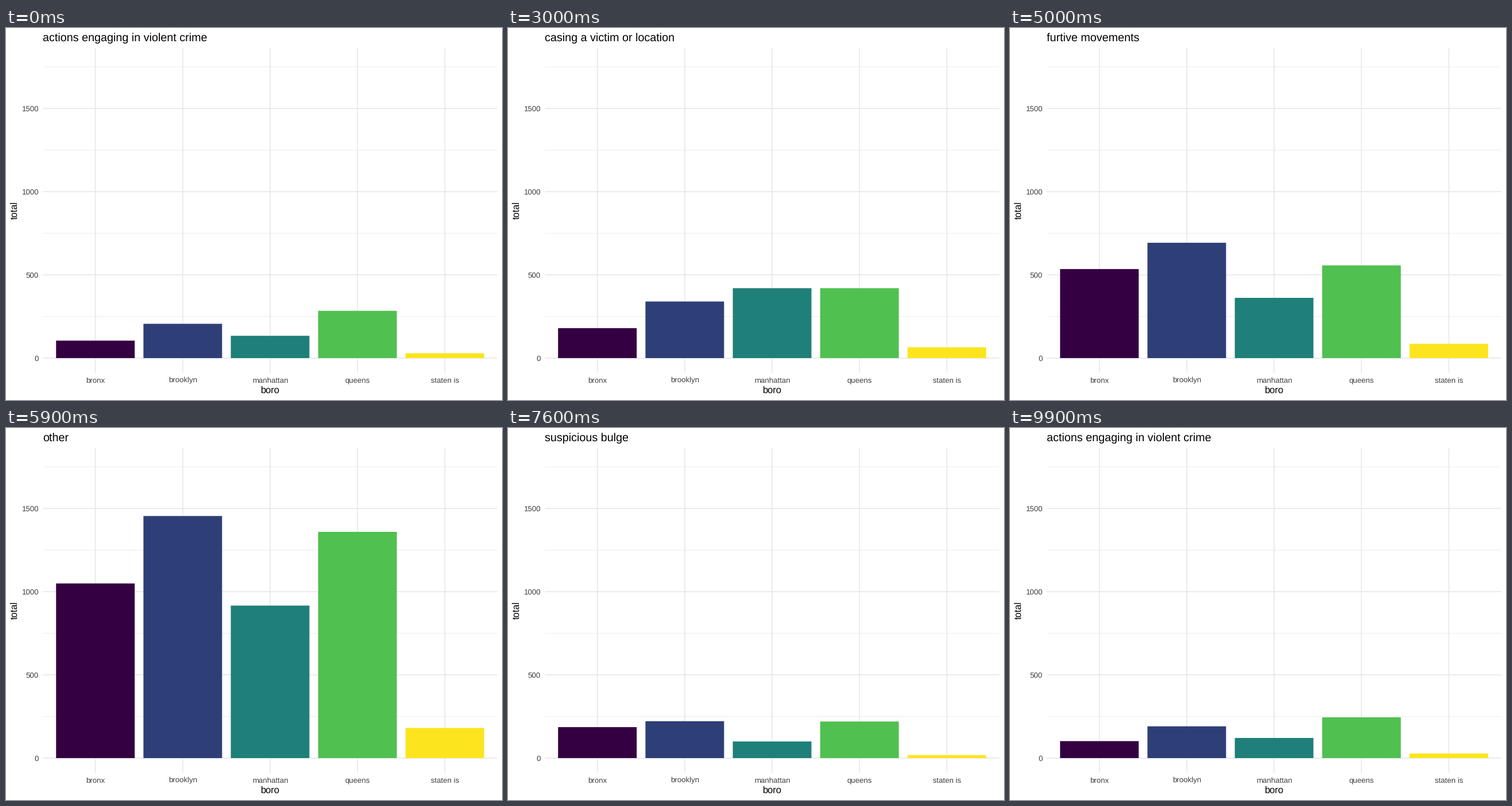
These frames come from a looping animation (864 px wide and 648 px high, 10 s). A matplotlib script:

```python
import matplotlib.pyplot as plt
from matplotlib.animation import FuncAnimation
from matplotlib.patches import Rectangle

plt.rcParams["font.family"] = "Liberation Sans"
plt.rcParams["text.hinting"] = "none"

WIDTH, HEIGHT, DPI = 864, 648, 108
LEFT, RIGHT, TOP, BOTTOM = 64.4, 855.75, 35.0, 600.7
ZERO_Y, PX_PER_UNIT = 575.0, 0.2899
STEP = (RIGHT - LEFT) / 5.2
GRID, LABEL = "#E7E7E7", "#3F3F3F"

BOROS = ["bronx", "brooklyn", "manhattan", "queens", "staten is"]
COLORS = ["#350042", "#2E3F78", "#1F8079", "#50C050", "#FCE51F"]

STATES = [
    ("actions engaging in violent crime", (105, 206, 134, 284, 29)),
    ("actions indicative of drug transaction", (240, 260, 330, 150, 29)),
    ("carrying suspicious object", (76, 88, 86, 99, 13)),
    ("casing a victim or location", (180, 340, 420, 420, 65)),
    ("fits a relevant description", (1093, 1774, 1316, 1250, 433)),
    ("furtive movements", (535, 693, 362, 557, 86)),
    ("other", (1178, 1645, 1055, 1560, 205)),
    ("suspicious bulge", (190, 230, 100, 180, 13)),
    ("suspect acting as a lookout", (170, 189, 99, 379, 38)),
    ("wearing clothes commonly used in a crime", (90, 131, 69, 89, 23)),
]
FRAMES_PER_STATE, HOLD, MOVE = 10, 5, 5


def y_of(value):
    return ZERO_Y - value * PX_PER_UNIT


def center(i):
    return LEFT + (0.6 + i) * STEP


fig = plt.figure(figsize=(WIDTH / DPI, HEIGHT / DPI), dpi=DPI, facecolor="white")
ax = fig.add_axes([0, 0, 1, 1])
ax.set_xlim(0, WIDTH)
ax.set_ylim(HEIGHT, 0)
ax.axis("off")


def grid_line(xs, ys, px):
    ax.plot(xs, ys, color=GRID, lw=px * 72 / DPI, solid_capstyle="butt",
            snap=False, zorder=1)


def label(x, y, text, size, color="black", ha="center", rotation=0):
    return ax.text(x, y, text, fontsize=size, color=color, ha=ha, va="baseline",
                   rotation=rotation, rotation_mode="anchor")


for value in range(250, 1751, 500):
    grid_line([LEFT, RIGHT], [y_of(value)] * 2, 0.8)
for value in range(0, 1501, 500):
    grid_line([LEFT, RIGHT], [y_of(value)] * 2, 1.6)
    label(57, y_of(value) + 4.7, str(value), 8.8, LABEL, ha="right")
for i, boro in enumerate(BOROS):
    grid_line([center(i)] * 2, [TOP, BOTTOM], 1.6)
    label(center(i), 617.6, boro, 8.8, LABEL)

label((LEFT + RIGHT) / 2, 636.3, "boro", 11)
label(20, (TOP + BOTTOM) / 2, "total", 11, rotation=90)
title = label(LEFT, 22.5, "", 13.2, ha="left")

bars = [
    ax.add_patch(Rectangle((center(i) - 0.45 * STEP, ZERO_Y), 0.9 * STEP, 0,
                           facecolor=color, edgecolor="none", lw=0,
                           snap=False, zorder=2))
    for i, color in enumerate(COLORS)
]


def update(frame):
    index, step = divmod(frame, FRAMES_PER_STATE)
    moved = max(0, step - HOLD)
    u = moved / MOVE
    name, start = STATES[index]
    next_name, end = STATES[(index + 1) % len(STATES)]
    title.set_text(next_name if moved > 3 else name)
    for bar, a, b in zip(bars, start, end):
        bar.set_height(-(a + (b - a) * u) * PX_PER_UNIT)
    return [title, *bars]


anim = FuncAnimation(fig, update, frames=len(STATES) * FRAMES_PER_STATE,
                     interval=100, repeat=True, repeat_delay=0)
plt.show()
```
